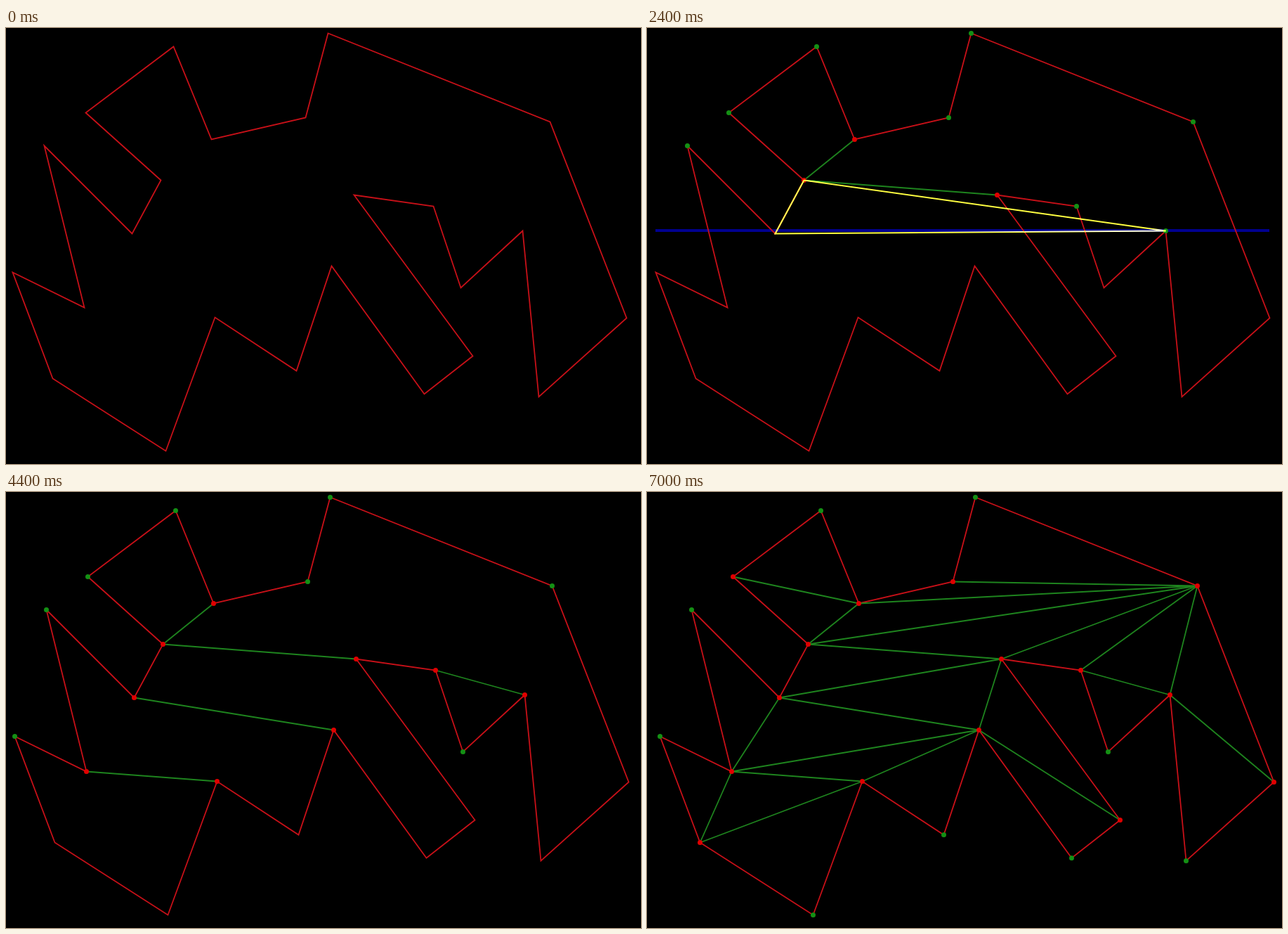
Animation, 904 px wide and 620 px high, one loop 7470 ms. Source, as an HTML page with a canvas:

```html
<!DOCTYPE html>
<html lang="en">
<head>
<meta charset="utf-8">
<title>Polygon triangulation by sweep line</title>
<style>
  html, body { margin: 0; height: 100%; overflow: hidden; background: #000; }
  canvas { display: block; }
</style>
</head>
<body>
<canvas id="stage" width="904" height="620"></canvas>
<script>
const ctx = document.getElementById('stage').getContext('2d');
const LOOP = 7470, START = 200, FINISH = 7000, TICK = 200 / 3;
const RED = '#c81018', GREEN = '#1e841e', YELLOW = '#ffff40', BLUE = '#000090';
const RED_DOT = '#e00000', GREEN_DOT = '#149014';

// Key points of the pace: [tick, step].
const PACE = [[0, 0], [47, 47], [63, 58], [82, 78], [98, 94]];

// The polygon, clockwise.
const outline = [
  [461, 7], [777, 133], [886, 412], [761, 524], [738, 288], [650, 369],
  [611, 253], [498, 237], [667, 466], [598, 520], [466, 338], [416, 487],
  [300, 411], [230, 601], [69, 498], [12, 347], [114, 397], [57, 167],
  [182, 292], [223, 216], [116, 120], [241, 26], [295, 158], [429, 127]
].map(([x, y]) => ({ x: x + 0.5, y: y + 0.5 }));
const count = outline.length;
outline.forEach((p, i) => {
  p.next = outline[(i + 1) % count];
  p.prev = outline[(i + count - 1) % count];
});

const byHeight = points => [...points].sort((p, q) => p.y - q.y);
const cross = (a, b, c) => (b.x - a.x) * (c.y - b.y) - (b.y - a.y) * (c.x - b.x);
const xAt = (p, y) => p.x + (p.next.x - p.x) * (y - p.y) / (p.next.y - p.y);

// Edges are named by their first point; those that climb have the inside on their right.
const edgesAt = y => outline
  .filter(p => (p.y - y) * (p.next.y - y) < 0)
  .sort((p, q) => xAt(p, y) - xAt(q, y));
const leftEdge = v => edgesAt(v.y).filter(p => p.next.y < p.y && xAt(p, v.y) < v.x).pop();

const visited = [], diagonals = [], steps = [];
function record(sweep, test) {
  steps.push({ visited: visited.length, diagonals: diagonals.length, sweep, test });
}

function bisect(v) {
  const edges = edgesAt(v.y);
  let low = 0, high = edges.length - 1;
  while (low < high) {
    const mid = (low + high) >> 1;
    record(v, edges[mid]);
    if (v.x > xAt(edges[mid], v.y)) low = mid + 1;
    else high = mid - 1;
  }
}

// Cuts the polygon into monotone pieces from top to bottom.
function sweepDown() {
  const helper = new Map();
  const isMerge = p => p.prev.y < p.y && p.next.y < p.y && cross(p.prev, p, p.next) < 0;
  record();
  for (const v of byHeight(outline)) {
    const prevBelow = v.prev.y > v.y, nextBelow = v.next.y > v.y;
    const reflex = cross(v.prev, v, v.next) < 0;
    const isTip = prevBelow === nextBelow;
    const before = diagonals.length;

    visited.push(v);
    record(v);
    if (!isTip || reflex) bisect(v);
    if (!nextBelow && isMerge(helper.get(v))) diagonals.push([v, helper.get(v)]);
    if (isTip ? reflex : nextBelow) {
      const edge = leftEdge(v), other = helper.get(edge);
      if ((isTip && nextBelow) || isMerge(other)) diagonals.push([v, other]);
      helper.set(edge, v);
    }
    if (prevBelow) helper.set(v.prev, v);
    for (let i = before; i <= diagonals.length; i++) record();
  }
}

function monotonePieces() {
  let pieces = [outline];
  for (const ends of diagonals) {
    pieces = pieces.flatMap(piece => {
      const [i, j] = ends.map(p => piece.indexOf(p)).sort((a, b) => a - b);
      return i < 0 ? [piece] : [piece.slice(i, j + 1), [...piece.slice(0, i + 1), ...piece.slice(j)]];
    });
  }
  const top = piece => Math.min(...piece.map(p => p.y));
  return pieces.sort((a, b) => top(a) - top(b));
}

function triangulate(piece) {
  const onLeft = p => piece[(piece.indexOf(p) + 1) % piece.length].y < p.y;
  const join = (p, q) => { diagonals.push([p, q]); record(); };
  const [first, second, ...rest] = byHeight(piece);
  let stack = [first, second];
  rest.pop();
  for (const v of rest) {
    let last = stack[stack.length - 1];
    if (onLeft(v) !== onLeft(last)) {
      stack.slice(1).forEach(p => join(v, p));
      stack = [last, v];
    } else {
      const side = onLeft(v) ? 1 : -1;
      stack.pop();
      while (stack.length && side * cross(v, last, stack[stack.length - 1]) > 0) {
        last = stack.pop();
        join(v, last);
      }
      stack.push(last, v);
    }
  }
  stack.slice(1, -1).forEach(p => join(piece.find(q => !rest.includes(q) && !stack.includes(q)), p));
}

function stepAt(tick) {
  const i = PACE.findIndex(([end]) => tick <= end);
  if (i < 1) return i < 0 ? steps.length - 1 : 0;
  const [t0, s0] = PACE[i - 1], [t1, s1] = PACE[i];
  return Math.floor(s0 + (s1 - s0) * (tick - t0) / (t1 - t0) + 1e-6);
}

function stroke(points, color, width, closed) {
  ctx.beginPath();
  for (const { x, y } of points) ctx.lineTo(x, y);
  if (closed) ctx.closePath();
  ctx.strokeStyle = color;
  ctx.lineWidth = width;
  ctx.stroke();
}

function dot({ x, y }, color) {
  ctx.beginPath();
  ctx.arc(x, y, 3.5, 0, 2 * Math.PI);
  ctx.fillStyle = color;
  ctx.fill();
}

function draw(time) {
  const started = time >= START;
  const tick = Math.floor((time - START + 5) / TICK);
  const step = started ? steps[Math.min(stepAt(tick), steps.length - 1)] : steps[0];
  const { sweep, test } = step;
  const lines = diagonals.slice(0, step.diagonals);

  ctx.setTransform(1, 0, 0, 1, 0, 0);
  ctx.fillStyle = '#000';
  ctx.fillRect(0, 0, 904, 620);
  ctx.translate(!started ? -3 : time < FINISH ? 0 : 6, 0);

  if (sweep) stroke([{ x: 12, y: sweep.y - 0.5 }, { x: 886, y: sweep.y - 0.5 }], BLUE, 4);
  stroke(outline, RED, 1.8, true);
  for (const line of lines) stroke(line, GREEN, 1.8);

  const joined = new Set(lines.flat());
  for (const p of visited.slice(0, step.visited)) dot(p, joined.has(p) ? RED_DOT : GREEN_DOT);

  if (test) {
    ctx.globalCompositeOperation = 'lighter';
    stroke([test, test.next, sweep], YELLOW, 2, true);
    ctx.globalCompositeOperation = 'source-over';
  }
}

sweepDown();
monotonePieces().forEach(triangulate);

const origin = performance.now();
function frame() {
  draw((performance.now() - origin) % LOOP);
  requestAnimationFrame(frame);
}
frame();
</script>
</body>
</html>
```
